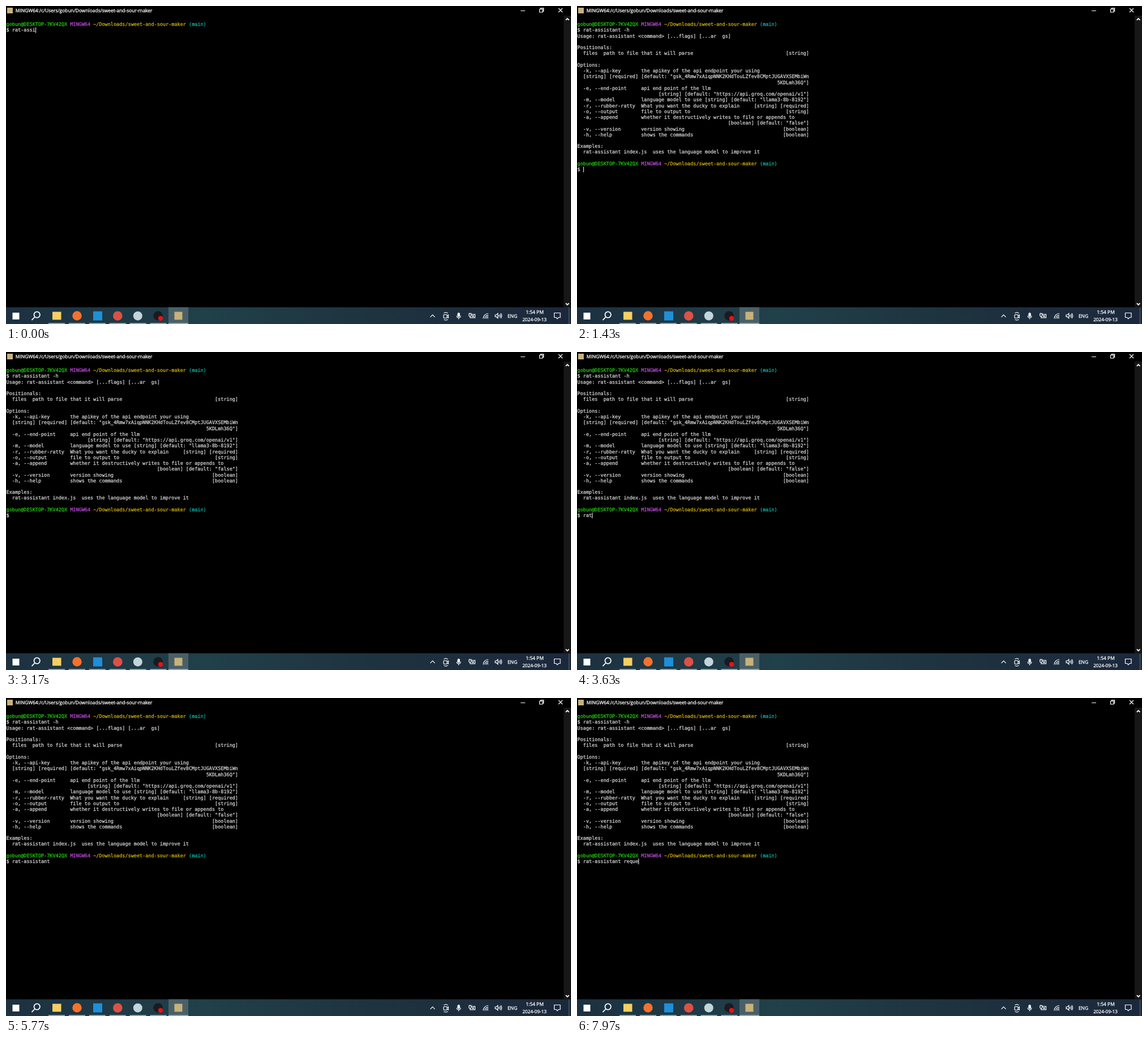
Animation of 998 by 561 pixels, one loop 8 s. Source, as an HTML page:

```html
<!DOCTYPE html>
<html lang="en">
<head>
<meta charset="utf-8">
<title>Terminal</title>
<style>
html, body { margin: 0; width: 100%; height: 100%; overflow: hidden; background: #000; }
svg { display: block; width: 998px; height: 561px; }
text { white-space: pre; text-rendering: geometricPrecision; stroke-width: .28px; }
.mono { font: 8.504px "DejaVu Sans Mono", monospace; fill: #d2d2d2; stroke: #d2d2d2; }
.ui { font: 8.43px "Open Sans", sans-serif; fill: #fff; stroke: #fff; }
.line { fill: none; stroke: #fff; stroke-width: 1.2px; }
.bold { stroke-width: 1.8px; }
</style>
</head>
<body>
<svg viewBox="0 0 998 561">
  <defs>
    <linearGradient id="bar">
      <stop offset="0" stop-color="#1d3140"/>
      <stop offset=".35" stop-color="#20404a"/>
      <stop offset=".65" stop-color="#1e3340"/>
      <stop offset="1" stop-color="#1b283c"/>
    </linearGradient>
  </defs>
  <rect width="998" height="561"/>

  <!-- title bar -->
  <rect x="2" y="3" width="10" height="10" fill="#c8b27a"/>
  <text class="ui" id="title" x="16.8" y="11.4"></text>
  <path class="line" d="M909 8.5h8M942.5 5.5h5.5v5.5h-5.5zM944.2 5.5v-1.7h5.4v5.4h-1.6M976 4l7 7M983 4l-7 7"/>

  <!-- scrollbar -->
  <rect x="985" y="17" width="13" height="514.5" fill="#171717"/>
  <path class="line bold" d="M988.8 24.8l2.8-2.8l2.8 2.8M988.8 524.4l2.8 2.8l2.8-2.8"/>

  <g id="screen"></g>
  <rect id="caret" width="1.2" height="10" fill="#dcdcdc"/>

  <!-- taskbar -->
  <rect y="531.5" width="998" height="29.5" fill="url(#bar)"/>
  <rect x="287" y="531.5" width="35" height="29.5" fill="#4a6067"/>
  <g id="under" fill="#76b9ed"></g>
  <rect x="11.5" y="541" width="12" height="12" fill="#fff"/>
  <path class="line bold" d="M59.9 544.6a5.2 5.2 0 1 0-10.4 0a5.2 5.2 0 1 0 10.4 0M50.9 548.5l-5.4 5.6"/>
  <rect x="82" y="539.5" width="15.5" height="14" fill="#f6cf62"/>
  <circle cx="125.5" cy="546.5" r="8.2" fill="#f5722c"/>
  <rect x="154" y="538.7" width="16" height="16" fill="#1f8fd8"/>
  <circle cx="197.3" cy="546.7" r="8.3" fill="#dd5144"/>
  <circle cx="232.8" cy="546.7" r="8" fill="#c3d5da"/>
  <circle cx="268.6" cy="546.5" r="8.3" fill="#1b1a1e"/>
  <circle cx="273" cy="551" r="4.2" fill="#ee1111"/>
  <rect x="297.5" y="539.5" width="14" height="14" fill="#c8b27a"/>

  <!-- tray -->
  <g class="line">
    <path d="M749.5 548.8l4-4l4 4"/>
    <rect x="773" y="544.5" width="6" height="6" rx="1"/>
    <path d="M779 546.3l2.4-1.3v5l-2.4-1.3M773.5 542c2-1.6 5-1.6 7 0M773.5 553c2 1.2 5 1.2 7 0"/>
    <rect x="798" y="541.7" width="3.2" height="6.2" rx="1.6" fill="#fff"/>
    <path d="M796.2 546.5c0 4.6 6.8 4.6 6.8 0M799.6 550v2.5"/>
    <path d="M821.5 544.2h7v5.6h-7M817.8 543h4v3.6q-2 2-4 0zM819.8 547.5v2.4h2M818.6 543v-1.5M821 543v-1.5"/>
    <rect x="823.5" y="545.8" width="3" height="2.6" fill="#fff" stroke="none"/>
    <path d="M843 551.5a9 9 0 0 1 9-9M845.8 551.5a6.2 6.2 0 0 1 6.2-6.2M848.6 551.5a3.4 3.4 0 0 1 3.4-3.4"/>
    <circle cx="851.2" cy="550.8" r=".8" fill="#fff" stroke="none"/>
    <path d="M864 545h2l2.8-2.6v8.4l-2.8-2.6h-2zM870.6 545q1.2 1.6 0 3.2M872.4 543.6q2.2 3 0 6M874 542.2q3.2 4.4 0 8.8"/>
    <path d="M968.5 541.5h10.5v8h-3.2l-2 2.3l-2-2.3h-3.3z"/>
    <path d="M994.5 532v29" stroke="#53616a"/>
  </g>
  <text class="ui" x="894.5" y="549.6" text-anchor="middle">ENG</text>
  <text class="ui" x="934" y="542.7" text-anchor="middle">1:54 PM</text>
  <text class="ui" x="933.5" y="555.6" text-anchor="middle" style="font-size:8.2px">2024-09-13</text>
</svg>
<script>
const LOOP = 8000, BLINK = 530;
const CELL_W = 5.12, CELL_H = 10.24;
const USER = "gobun", HOST = "DESKTOP-7KV42QX", DIR = "Downloads/sweet-and-sour-maker";
const $ = id => document.getElementById(id);

const ENTER = 1010, OUTPUT = 1200, PROMPT = 1300;
const first = { text: "rat-assistant -h", start: 8, row: 1,
  keys: [30, 130, 240, 350, 460, 570, 770, 880] };
const second = { text: "rat-assistant reque", start: 0, row: 25,
  keys: [3200, 3360, 3500, 3970, 4170, 4280, 4400, 4510, 4620, 4740, 4850, 4960,
    5070, 5230, 7430, 7550, 7670, 7790, 7930] };
const events = [0, ...first.keys, ENTER, OUTPUT, PROMPT, ...second.keys];

// left part, then a part flush with column 80
const fit = (left, right) => left + right.padStart(80 - left.length);
const opt = (flag, text, right = "") => fit(("  " + flag).padEnd(22) + text, right);

const help = [
  "Usage: rat-assistant <command> [...flags] [...ar  gs]",
  "",
  "Positionals:",
  fit("  files  path to file that it will parse", "[string]"),
  "",
  "Options:",
  opt("-k, --api-key", "the apikey of the api endpoint your using"),
  '  [string] [required] [default: "gsk_4Rmw7xAiqpNNK2KHdTouLZfev8CMptJUGAVXSEMbiWn',
  fit("", '5KDLmh36Q"]'),
  opt("-e, --end-point", "api end point of the llm"),
  fit("", '[string] [default: "https://api.groq.com/openai/v1"]'),
  opt("-m, --model", "language model to use", '[string] [default: "llama3-8b-8192"]'),
  opt("-r, --rubber-ratty", "What you want the ducky to explain", "[string] [required]"),
  opt("-o, --output", "file to output to", "[string]"),
  opt("-a, --append", "whether it destructively writes to file or appends to"),
  fit("", '[boolean] [default: "false"]'),
  opt("-v, --version", "version showing", "[boolean]"),
  opt("-h, --help", "shows the commands", "[boolean]"),
  "",
  "Examples:",
  "  rat-assistant index.js  uses the language model to improve it"
];

function make(tag, parent, attrs) {
  const el = document.createElementNS("http://www.w3.org/2000/svg", tag);
  for (const k in attrs) el.setAttribute(k, attrs[k]);
  return parent.appendChild(el);
}

function addRow(parent, row, text = "") {
  const el = make("text", parent, { class: "mono", x: 0.6, y: 35.2 + row * CELL_H });
  el.textContent = text;
  return el;
}

function addPrompt(parent, row) {
  const el = addRow(parent, row);
  const parts = [[`${USER}@${HOST} `, "#20cc08"], ["MINGW64 ", "#b848d2"],
    [`~/${DIR} `, "#d0b000"], ["(main)", "#08b8a8"]];
  for (const [text, color] of parts)
    make("tspan", el, { fill: color, stroke: color }).textContent = text;
}

const screen = $("screen");
addPrompt(screen, 0);
const line1 = addRow(screen, first.row);
const helpBox = make("g", screen);
help.forEach((text, i) => addRow(helpBox, i + 2, text));
const promptBox = make("g", screen);
addPrompt(promptBox, 24);
const line2 = addRow(promptBox, second.row);

$("title").textContent = `MINGW64:/c/Users/${USER}/${DIR}`;
for (let i = 0; i < 6; i++)
  make("rect", $("under"), { x: 75 + i * 35.9, y: 559.3, width: 29, height: 1.7 });
make("rect", $("under"), { x: 287, y: 559.3, width: 35, height: 1.7 });

const show = (el, on) => el.setAttribute("visibility", on ? "visible" : "hidden");
const typed = (cmd, t) =>
  "$ " + cmd.text.slice(0, cmd.start + cmd.keys.filter(k => k <= t).length);

function draw(t) {
  const a = typed(first, t), b = typed(second, t);
  line1.textContent = a;
  line2.textContent = b;
  show(helpBox, t >= OUTPUT);
  show(promptBox, t >= PROMPT);

  let col = 0, row;
  if (t < ENTER) { col = a.length; row = first.row; }
  else if (t < OUTPUT) row = 2;
  else if (t < PROMPT) row = 23;
  else { col = b.length; row = second.row; }
  const caret = $("caret");
  caret.setAttribute("x", 0.7 + col * CELL_W);
  caret.setAttribute("y", 27.4 + row * CELL_H);
  const last = Math.max(...events.filter(e => e <= t));
  show(caret, Math.floor((t - last) / BLINK) % 2 === 0);
}

const begin = performance.now();
function tick() {
  draw((performance.now() - begin) % LOOP);
  requestAnimationFrame(tick);
}
tick();
</script>
</body>
</html>
```
